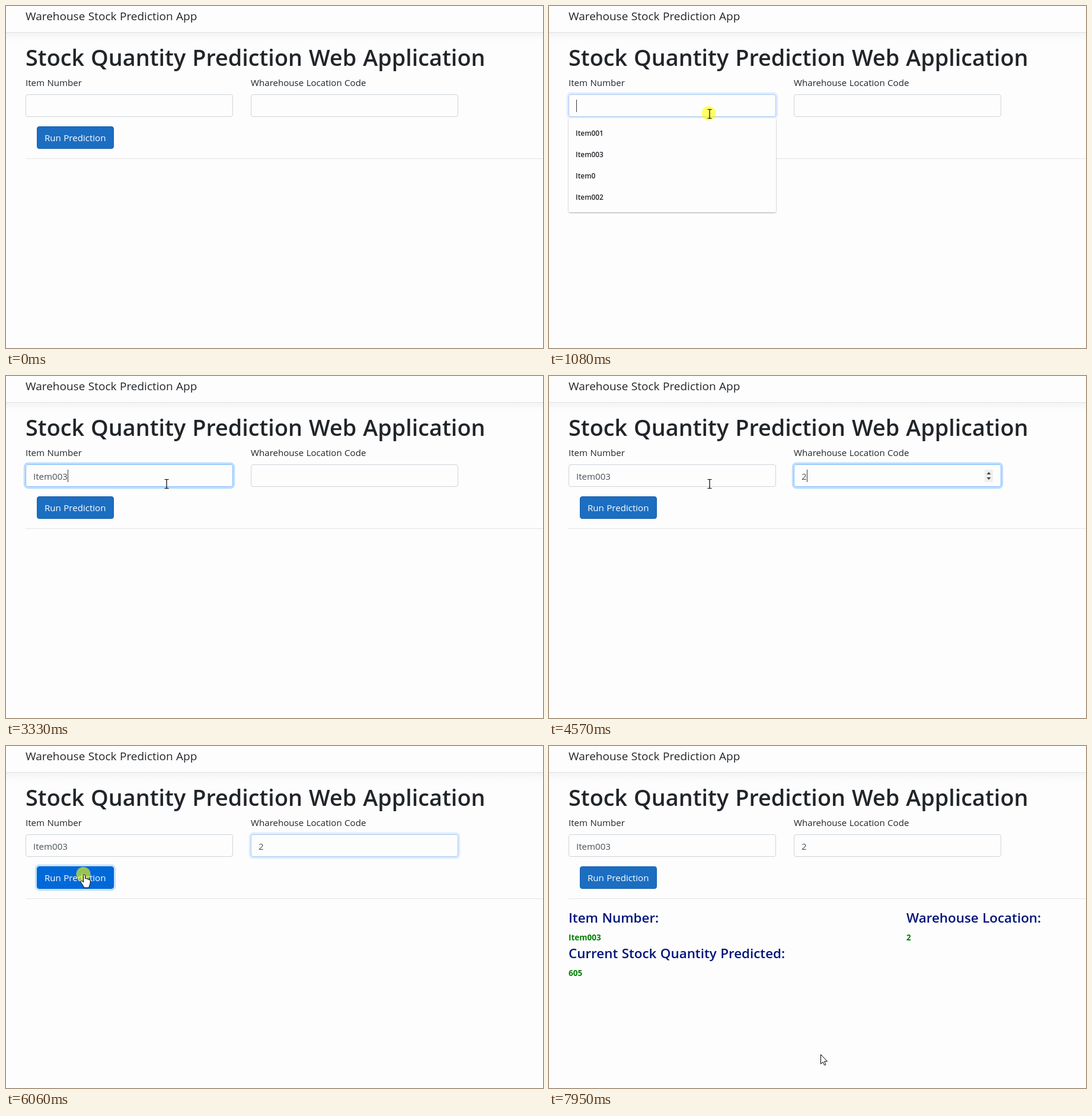
These frames come from a looping animation (906 px wide and 577 px high, 8000 ms). An HTML page:

```html
<!DOCTYPE html>
<html lang="en">
<head>
<meta charset="utf-8">
<title>Warehouse Stock Prediction App</title>
<style>
  html, body { margin: 0; width: 100%; height: 100%; overflow: hidden; background: #fdfdfd; }
  svg { display: block; width: 100vw; height: 100vh; }
  text { font-family: "Open Sans", "Noto Sans", sans-serif; font-size: 15.1px; word-spacing: .03em; fill: #212529; }
  .brand { font-size: 19px; }
  .title { font-size: 37.8px; font-weight: 600; }
  .value { fill: #495057; }
  .option { font-size: 11.9px; font-weight: 600; }
  .head { font-size: 22.4px; font-weight: 600; fill: #00137a; }
  .result { font-size: 13.5px; font-weight: 700; fill: #008000; }
  .caret { fill: #343a40; }
</style>
</head>
<body>
<svg viewBox="0 0 906 577" xmlns="http://www.w3.org/2000/svg">
  <defs>
    <linearGradient id="navShade" x1="0" y1="0" x2="0" y2="1">
      <stop offset="0" stop-opacity=".037"/>
      <stop offset=".25" stop-opacity=".025"/>
      <stop offset=".6" stop-opacity=".008"/>
      <stop offset="1" stop-opacity="0"/>
    </linearGradient>
    <filter id="drop" x="-5%" y="-5%" width="110%" height="112%">
      <feDropShadow dx="0" dy="1" stdDeviation="1.3" flood-opacity=".35"/>
    </filter>
  </defs>
  <rect width="906" height="577" fill="#fdfdfd"/>

  <rect y="45" width="906" height="17" fill="url(#navShade)"/>
  <rect y="44" width="906" height="1" fill="#dee2e6"/>
  <text class="brand" x="33" y="24">Warehouse Stock Prediction App</text>
  <text class="title" x="33" y="101">Stock Quantity Prediction Web Application</text>
  <text x="33" y="135">Item Number</text>
  <text x="413" y="135">Wharehouse Location Code</text>

  <rect id="buttonRing" x="50.4" y="201.4" width="133.2" height="41.2" rx="5.5" fill="none" stroke="#268fff" stroke-width="3.2"/>
  <rect id="button" x="52.5" y="203.5" width="129" height="37" rx="3.5"/>
  <text x="65" y="228" style="fill:#fff">Run Prediction</text>
  <rect x="33" y="257" width="873" height="1" fill="#e4e4e4"/>

  <g id="fields"></g>
  <g id="spinner">
    <rect x="735" y="158" width="14" height="21" fill="#efefef"/>
    <path d="M738.5 166l3.5-4 3.5 4zM738.5 171l3.5 4 3.5-4z" fill="#404040"/>
  </g>

  <g id="list">
    <rect id="panel" x="33" y="189" width="350" rx="3" fill="#fdfdfd" filter="url(#drop)"/>
    <g id="options"></g>
  </g>

  <g id="results">
    <text class="head" x="33" y="298">Item Number:</text>
    <text class="result" x="33" y="328">Item003</text>
    <text class="head" x="603" y="298">Warehouse Location:</text>
    <text class="result" x="603" y="328">2</text>
    <text class="head" x="33" y="358">Current Stock Quantity Predicted:</text>
    <text class="result" x="33" y="388">605</text>
  </g>

  <circle id="halo" r="12" fill="#ffff00" fill-opacity=".6"/>
  <g id="pointer" stroke="#000" stroke-linejoin="round">
    <path id="arrow" fill="#fff" d="M.5.5V16.5L4.2 13 6.6 18.5 9 17.5 6.7 12H11.5Z"/>
    <path id="beam" fill="none" stroke-width="1.2" d="M-3.5-7.5H-1Q0-7.5 0-6.5Q0-7.5 1-7.5H3.5M0-6.5V6.5M-3.5 7.5H-1Q0 7.5 0 6.5Q0 7.5 1 7.5H3.5"/>
    <path id="hand" fill="#fff" d="M-1.5 11V1.5a1.5 1.5 0 0 1 3 0V7a1.6 1.6 0 0 1 3 .3V8a1.6 1.6 0 0 1 3 .4V9a1.5 1.5 0 0 1 2.7.8V14c0 3-2.2 4.5-2.2 8H-.5c0-2-3-5.5-5.3-9.5C-6.6 10.6-4.4 9.4-3.2 11L-1.5 13Z"/>
  </g>
</svg>

<script>
const LOOP = 8000;
const CLICKS = [1000, 5970];
const TAB = 3560, SUBMIT = 5970, LOADED = 6300;

const $ = id => document.getElementById(id);
const set = (el, attrs) => { for (const k in attrs) el.setAttribute(k, attrs[k]); };
const show = (el, on) => el.setAttribute('visibility', on ? 'visible' : 'hidden');
const within = (t, a, b) => t >= a && t < b;

function add(parent, tag, attrs, label = '') {
  const el = document.createElementNS('http://www.w3.org/2000/svg', tag);
  set(el, attrs);
  el.textContent = label;
  return parent.appendChild(el);
}

// CSS-like 150 ms transition, seen at the capture rate of 80 ms
const fade = (t, start) => Math.max(0, Math.min(1, Math.floor((t - start) / 80) / 2));

function mix(a, b, u) {
  return `rgb(${a.map((v, i) => Math.round(v + (b[i] - v) * u)).join()})`;
}

function makeField(x) {
  const g = $('fields');
  return {
    x,
    ring: add(g, 'rect', { x: x - 1.6, y: 147.4, width: 353.2, height: 41.2, rx: 5.5,
      fill: 'none', stroke: '#007bff', 'stroke-width': 3.2 }),
    box: add(g, 'rect', { x: x + .5, y: 149.5, width: 349, height: 37, rx: 3.5, fill: '#fdfdfd' }),
    text: add(g, 'text', { class: 'value', x: x + 13, y: 175 }),
    caret: add(g, 'rect', { class: 'caret', y: 158, width: 1, height: 21 })
  };
}

const item = makeField(33), place = makeField(413);

const options = ['Item001', 'Item003', 'Item0', 'Item002'].map(label => ({
  label, el: add($('options'), 'text', { class: 'option', x: 45 }, label)
}));

// Key presses: time and the length of the value after it
const itemKeys = [[1850, 1], [2000, 2], [2170, 3], [2240, 4], [3010, 5], [3180, 6], [3330, 7]];

function typed(t) {
  const done = itemKeys.filter(k => t >= k[0]).pop();
  return 'Item003'.slice(0, done ? done[1] : 0);
}

// Pointer moves: start, end, then one place per step
const moves = [
  { a: 70, b: 150, pts: [[763, 547, 'arrow'], [757, 541, 'arrow']] },
  { a: 380, b: 850, pts: [[722, 500, 'arrow'], [610, 370, 'arrow'], [490, 235, 'arrow'],
    [395, 140, 'arrow'], [325, 108, 'beam'], [284, 150, 'beam'], [271, 182, 'beam']] },
  { a: 5270, b: 5740, pts: [[258, 196, 'arrow'], [220, 225, 'arrow'], [179, 243, 'arrow'],
    [146, 242, 'arrow'], [132, 236, 'hand'], [130, 223, 'hand'], [132, 217, 'hand']] },
  { a: 7540, b: 7950, pts: [[143, 224, 'hand'], [190, 262, 'arrow'], [275, 345, 'arrow'],
    [368, 438, 'arrow'], [436, 501, 'arrow'], [458, 520, 'arrow']] }
];

function pointerAt(t) {
  const m = moves.filter(v => t >= v.a).pop();
  if (!m) return null;
  const last = m.pts.length - 1;
  const step = Math.floor((t - m.a) / (m.b - m.a) * last + 1e-6);
  return m.pts[Math.min(last, step)];
}

function drawField(f, value, focus, caretOn) {
  f.text.textContent = value;
  set(f.ring, { 'stroke-opacity': .25 * focus });
  set(f.box, { stroke: mix([206, 212, 218], [128, 189, 255], focus) });
  show(f.caret, caretOn);
  if (caretOn) {
    const w = value ? f.text.getComputedTextLength() : 0;
    set(f.caret, { x: Math.round(f.x + 13 + w) });
  }
}

function drawList(t) {
  show($('list'), within(t, 1080, 3330));
  const prefix = typed(t);
  let rows = 0;
  for (const o of options) {
    const match = o.label.startsWith(prefix);
    o.el.setAttribute('display', match ? 'inline' : 'none');
    if (match) set(o.el, { y: 219 + 36 * rows++ });
  }
  set($('panel'), { height: 15 + 36 * rows });
}

function drawButton(t) {
  let hover = t < LOADED ? fade(t, 5505) : 0;
  if (within(t, 7540, 7700)) hover = .5;
  set($('button'), {
    fill: mix([27, 110, 194], [0, 105, 217], hover),
    stroke: mix([24, 97, 172], [0, 98, 204], hover)
  });
  set($('buttonRing'), { 'stroke-opacity': t < LOADED ? .5 * fade(t, SUBMIT) : 0 });
}

function drawPointer(t) {
  const p = pointerAt(t);
  for (const kind of ['arrow', 'beam', 'hand']) show($(kind), p && p[2] === kind);
  show($('halo'), CLICKS.some(c => within(t, c, c + 160)));
  if (!p) return;
  set($('pointer'), { transform: `translate(${p[0]} ${p[1]})` });
  set($('halo'), { cx: p[0] - 1.5, cy: p[1] - 1 });
}

function draw(t) {
  const itemCaret = within(t, 1000, 1540) || within(t, 1850, 2780) || within(t, 3010, TAB);
  const placeCaret = within(t, TAB, 4100) || within(t, 4570, 5120) || within(t, 5660, SUBMIT);
  drawField(item, typed(t), fade(t, 1000) - fade(t, TAB), itemCaret);
  drawField(place, t >= 4570 ? '2' : '', fade(t, TAB) - fade(t, SUBMIT), placeCaret);
  show($('spinner'), within(t, TAB, SUBMIT));
  drawList(t);
  drawButton(t);
  show($('results'), t >= LOADED);
  drawPointer(t);
}

const start = performance.now();
function tick() {
  draw((performance.now() - start) % LOOP);
  requestAnimationFrame(tick);
}
tick();
</script>
</body>
</html>
```
